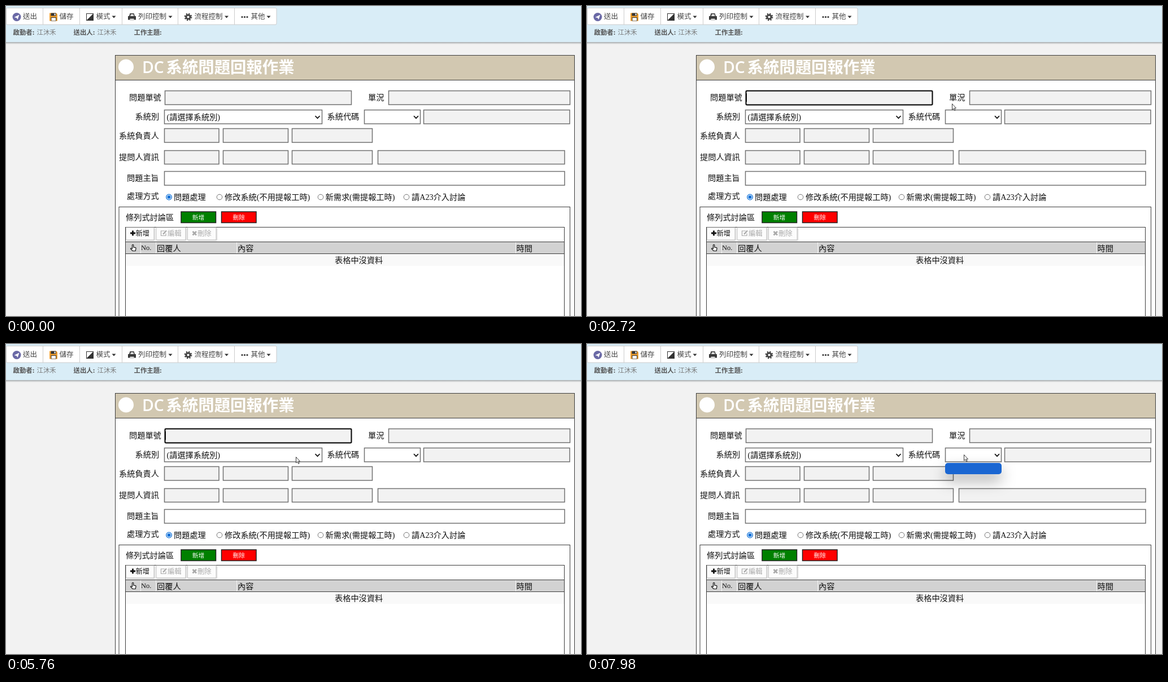
Animation, 1018 px wide and 550 px high, one loop 8000 ms. Source, as an HTML page:

```html
<!DOCTYPE html>
<html lang="zh-Hant">
<head>
<meta charset="utf-8">
<title>問題回報作業</title>
<style>
html, body { margin: 0; width: 100%; height: 100%; overflow: hidden; background: #f2f2f2; }
svg { display: block; }
text { white-space: pre; }
.ui { font-family: "Noto Sans CJK TC", "Noto Sans CJK JP", "Noto Sans CJK SC", sans-serif; }
.form { font: 14.2px "Liberation Serif", "Noto Sans CJK TC", "Noto Sans CJK JP", serif; fill: #111; }
.menu { font-size: 12.5px; fill: #444; }
.info { font-size: 11.4px; fill: #777; }
.info .key { font-weight: 700; fill: #555; }
.field { fill: #f2f2f2; stroke: #727272; stroke-width: 1.5; }
.open { fill: #fff; }
.ring { fill: none; stroke: #101010; stroke-width: 2; }
.chevron { fill: none; stroke: #111; stroke-width: 1.8; }
.frame { fill: none; stroke: #3c3c3c; }
.mini { fill: #fcfcfc; stroke: #c4c4c4; filter: drop-shadow(1px 1px 1px #0003); }
.popup { filter: drop-shadow(0 12px 13px rgba(0, 0, 0, .32)); }

.step { opacity: 0; animation: 8s step-end infinite; }
#cursor { animation: move 8s linear infinite; }

@keyframes move {
  0%, 4.875% { transform: translate(483px, 5px); }
  12.75% { transform: translate(379.5px, 131.5px); }
  14.5% { transform: translate(352px, 155px); }
  15.375%, 21.375% { transform: translate(352px, 160px); }
  28.125%, 29.875% { transform: translate(402px, 168px); }
  34% { transform: translate(646px, 173px); }
  36.5% { transform: translate(640px, 177px); }
  39.75% { transform: translate(520px, 171px); }
  41.5%, 45.75% { transform: translate(508.5px, 171px); }
  46.5%, 61.5% { transform: translate(513.5px, 165.5px); }
  64% { transform: translate(600px, 159px); }
  66.5% { transform: translate(761px, 170px); }
  69% { transform: translate(640px, 195px); }
  71.25% { transform: translate(515px, 200px); }
  72%, 80.4% { transform: translate(513px, 200px); }
  81.25%, 88.5% { transform: translate(509px, 199px); }
  94.5%, 97% { transform: translate(648px, 195px); }
  99.75%, 100% { transform: translate(667px, 196px); }
}
@keyframes arrow {
  0% { opacity: 0; } 4.875% { opacity: 1; } 10.5% { opacity: 0; }
  33.4% { opacity: 1; } 37.3% { opacity: 0; } 64.2%, 100% { opacity: 1; }
}
@keyframes beam {
  0% { opacity: 0; } 10.5% { opacity: 1; } 33.4% { opacity: 0; }
  37.3% { opacity: 1; } 64.2%, 100% { opacity: 0; }
}
@keyframes click {
  0% { opacity: 0; } 15.375% { opacity: 1; } 18% { opacity: .66; } 18.8% { opacity: .33; } 19.625% { opacity: 0; }
  74.5% { opacity: 1; } 76.375% { opacity: .66; } 77.5% { opacity: .33; } 78.75% { opacity: 0; }
  87% { opacity: 1; } 88.5% { opacity: 0; } 94.5% { opacity: 1; } 96.6%, 100% { opacity: 0; }
}
@keyframes focus-no { 0% { opacity: 0; } 15.375% { opacity: 1; } 74.5%, 100% { opacity: 0; } }
@keyframes focus-system { 0% { opacity: 0; } 87% { opacity: 1; } 94.5%, 100% { opacity: 0; } }
@keyframes list-system { 0% { opacity: 0; } 74.5% { opacity: 1; } 87%, 100% { opacity: 0; } }
@keyframes list-code { 0% { opacity: 0; } 95%, 100% { opacity: 1; } }
@keyframes key1 { 0% { opacity: 0; } 38.875% { opacity: 1; } 56.625%, 100% { opacity: 0; } }
@keyframes key2 { 0% { opacity: 0; } 40.625% { opacity: 1; } 54.875%, 100% { opacity: 0; } }
@keyframes key3 { 0% { opacity: 0; } 44% { opacity: 1; } 52.25%, 100% { opacity: 0; } }
@keyframes caret {
  0% { opacity: 0; transform: none; }
  15.375% { opacity: 1; } 21.625% { opacity: 0; } 27.875% { opacity: 1; } 34.125% { opacity: 0; transform: none; }
  38.875% { opacity: 1; transform: translateX(6px); }
  40.625% { opacity: 1; transform: translateX(12px); }
  44% { opacity: 1; transform: translateX(18px); }
  50.625% { opacity: 0; transform: translateX(18px); }
  52.25% { opacity: 1; transform: translateX(12px); }
  54.875% { opacity: 1; transform: translateX(6px); }
  56.625% { opacity: 1; transform: none; }
  63.75% { opacity: 0; } 70% { opacity: 1; } 74.5%, 100% { opacity: 0; transform: none; }
}
</style>
</head>
<body>
<svg width="1018" height="550" viewBox="0 0 1018 550">
  <defs>
    <linearGradient id="fade" x2="0" y2="1">
      <stop stop-color="#a4a8aa"/><stop offset="1" stop-color="#f2f2f2"/>
    </linearGradient>
    <path id="down" d="M-3.5-1.5h7l-3.5 4z" fill="#333"/>
    <path id="chev" class="chevron" d="M-4-2 0 2.2 4-2"/>
    <circle id="radio" r="4.8" fill="#fff" stroke="#767676"/>
  </defs>

  <!-- toolbar -->
  <rect width="1018" height="64" fill="#d9edf7"/>
  <rect y="64" width="1018" height="4" fill="url(#fade)"/>
  <rect x=".5" y="3.5" width="478.500" height="29.500" rx="2" fill="#fff" stroke="#ccc"/>
  <path d="M65.500 4v29M130.500 4v29M205.500 4v29M304.500 4v29M404.500 4v29" stroke="#ccc"/>
  <circle cx="19" cy="19.500" r="7.500" fill="#6a69a6"/>
  <path d="M14.500 20 23.500 15.500 20.500 24 18.800 21z" fill="#fff"/>
  <path d="M77 12.500h12l2 2v12h-14z" fill="#f0a030"/>
  <path d="M79.500 12.500h9v5h-9zM79.500 20h9.500v6.500h-9.500z" fill="#333"/>
  <path d="M80.500 21h7.500v5h-7.500zM85.500 13.500h2v3h-2z" fill="#fff"/>
  <rect x="142.500" y="13.500" width="12" height="12" fill="#fff" stroke="#333"/>
  <path d="M154.500 13.500v12h-12z" fill="#333"/>
  <path d="M219.500 13h7l1.500 5h2v6.500h-14v-6.500h2z" fill="#3a3a3a"/>
  <path d="M221 14.500h4.500l1 3.500h-6.500zM219.500 22.500h7v3.500h-7z" fill="#ddd"/>
  <circle cx="322.500" cy="19.500" r="5.700" fill="none" stroke="#444" stroke-width="2.400" stroke-dasharray="2.240"/>
  <circle cx="322.500" cy="19.500" r="3.600" fill="none" stroke="#444" stroke-width="3"/>
  <g fill="#333"><circle cx="418" cy="19.500" r="1.600"/><circle cx="422.500" cy="19.500" r="1.600"/><circle cx="427" cy="19.500" r="1.600"/></g>
  <g class="ui menu">
    <text x="30" y="22.800">送出</text>
    <text x="94.500" y="22.800">儲存</text>
    <text x="159.500" y="22.800">模式</text>
    <text x="234" y="22.800">列印控制</text>
    <text x="333.500" y="22.800">流程控制</text>
    <text x="433.500" y="22.800">其他</text>
  </g>
  <use href="#down" x="191" y="19"/><use href="#down" x="291" y="19"/>
  <use href="#down" x="390.500" y="19"/><use href="#down" x="465" y="19"/>
  <g class="ui info">
    <text x="12.500" y="51.300" class="key">啟動者:</text><text x="54.500" y="51.300">江沐禾</text>
    <text x="119.500" y="51.300" class="key">送出人:</text><text x="161.500" y="51.300">江沐禾</text>
    <text x="226.500" y="51.300" class="key">工作主題:</text>
  </g>

  <!-- form panel -->
  <rect x="193.500" y="87.500" width="813" height="480" fill="#fff" stroke="#3c3c3c"/>
  <rect x="193.500" y="87.500" width="813" height="44" fill="#d2c8b1" stroke="#3c3c3c"/>
  <circle cx="212.500" cy="108" r="13.500" fill="#fff"/>
  <g font-size="28.400" font-weight="700" fill="#fff">
    <text x="241" y="118.500" font-family="Open Sans, sans-serif" font-weight="600">DC</text>
    <text x="283.500" y="118.500" class="ui">系統問題回報作業</text>
  </g>

  <g class="field">
    <rect x="281.500" y="150.500" width="330" height="24.500"/>
    <rect x="677.500" y="150.500" width="321" height="24.500"/>
    <rect x="280.500" y="184.500" width="279" height="24.500" class="open"/>
    <rect x="634.500" y="184.500" width="99" height="24.500" class="open"/>
    <rect x="739.500" y="184.500" width="258.500" height="24.500"/>
    <rect x="280.500" y="217.500" width="96.500" height="24.500"/>
    <rect x="384.500" y="217.500" width="115" height="24.500"/>
    <rect x="506.500" y="217.500" width="142" height="24.500"/>
    <rect x="280.500" y="256.500" width="96.500" height="24"/>
    <rect x="384.500" y="256.500" width="115" height="24"/>
    <rect x="506.500" y="256.500" width="142" height="24"/>
    <rect x="658.500" y="256.500" width="330.500" height="24"/>
    <rect x="280.500" y="293.500" width="708.500" height="24.500" class="open"/>
  </g>
  <use href="#chev" x="551.500" y="197"/><use href="#chev" x="726" y="197"/>

  <use href="#radio" x="378" y="339"/><use href="#radio" x="557" y="339"/><use href="#radio" x="709" y="339"/>
  <circle cx="288.500" cy="339" r="4.800" fill="#fff" stroke="#0b6fd8" stroke-width="1.300"/>
  <circle cx="288.500" cy="339" r="3" fill="#0b6fd8"/>

  <g class="form">
    <text x="218" y="166.500">問題單號</text><text x="641" y="166.500">單況</text>
    <text x="228.500" y="201">系統別</text><text x="284.500" y="201.500">(請選擇系統別)</text><text x="568.500" y="201">系統代碼</text>
    <text x="200" y="234.500">系統負責人</text>
    <text x="200" y="272.500">提問人資訊</text>
    <text x="214" y="310">問題主旨</text>
    <text x="214" y="342">處理方式</text>
    <text x="297" y="344">問題處理</text><text x="387" y="344">修改系統(不用提報工時)</text>
    <text x="565.500" y="344">新需求(需提報工時)</text><text x="718" y="344">請A23介入討論</text>
    <text x="212" y="379.500">條列式討論區</text>
  </g>

  <!-- discussion table -->
  <rect class="frame" x="200" y="356.500" width="798.500" height="220"/>
  <g stroke="#222" stroke-width="1.500">
    <rect x="310" y="365" width="61.500" height="19.500" fill="#008000"/>
    <rect x="381.500" y="365" width="61.500" height="19.500" fill="#f00"/>
  </g>
  <g class="ui" font-size="10.700" fill="#fff">
    <text x="329.800" y="379">新增</text><text x="401.500" y="379">刪除</text>
  </g>
  <rect class="frame" x="211.500" y="392.500" width="777" height="180"/>
  <g class="mini">
    <rect x="212.500" y="393" width="49.500" height="22"/>
    <rect x="266" y="393" width="52" height="22"/>
    <rect x="321.500" y="393" width="50.500" height="22"/>
  </g>
  <path d="M224.500 398.500v9M220 403h9" stroke="#111" stroke-width="2.800"/>
  <g fill="none" stroke="#aaa">
    <path d="M281 399h-6.500v8.500h8.500v-4" stroke-width="1.200"/><path d="m278 405 6-6.500" stroke-width="2.400"/>
    <path d="m330.500 400 6.500 6.500m0-6.500-6.500 6.500" stroke-width="2.800"/>
  </g>
  <g class="ui" font-size="12.300" fill="#111">
    <text x="229.500" y="407.500">新增</text>
    <g fill="#aaa"><text x="286" y="407.500">編輯</text><text x="339" y="407.500">刪除</text></g>
  </g>
  <rect x="211.500" y="418.500" width="777" height="21" fill="#d2d2d2" stroke="#3c3c3c"/>
  <path d="M238.500 419v20M265.500 419v20M408.500 419v20M902.500 419v20" stroke="#f4f4f4"/>
  <rect x="212" y="440" width="776" height="21" fill="#f9f9f9"/>
  <path d="M223.500 430.500v-6.500q1.200-1.500 2.200 0v4l3.500.6q1 .3.800 1.600l-.8 4.300h-5l-3.700-4q.6-1.500 3 0z" fill="#fff" stroke="#111" stroke-width="1.200"/>
  <g class="form">
    <text x="239" y="433" font-size="12.400">No.</text>
    <text x="267" y="434.500">回覆人</text><text x="410" y="434.500">內容</text><text x="903.500" y="434.500">時間</text>
    <text x="582" y="455.500">表格中沒資料</text>
  </g>

  <!-- typing and focus -->
  <rect class="ring step" style="animation-name:focus-no" x="281.500" y="150.500" width="330" height="25" rx="2"/>
  <rect class="ring step" style="animation-name:focus-system" x="280.500" y="184.500" width="279" height="25" rx="2"/>
  <g class="form" font-size="13.500">
    <text class="step" style="animation-name:key1" x="282" y="168">e</text>
    <text class="step" style="animation-name:key2" x="288" y="168">e</text>
    <text class="step" style="animation-name:key3" x="294" y="168">e</text>
  </g>
  <rect class="step" style="animation-name:caret" x="282" y="155" width="1" height="15"/>

  <!-- dropdown lists -->
  <g class="step" style="animation-name:list-system">
    <rect class="popup" x="280" y="211" width="280" height="101" rx="5" fill="#fff"/>
    <path d="M280 231v-15q0-5 5-5h270q5 0 5 5v15z" fill="#1a66d2"/>
    <g class="form">
      <text x="284.500" y="226.500" fill="#fff">(請選擇系統別)</text>
      <text x="284.500" y="246.500">生產系統</text><text x="284.500" y="266.500">人事系統</text>
      <text x="284.500" y="286.500">財務系統</text><text x="284.500" y="306.500">其他系統</text>
    </g>
  </g>
  <g class="step" style="animation-name:list-code">
    <rect class="popup" x="634" y="211" width="100" height="20" rx="5" fill="#1a66d2"/>
  </g>

  <g id="cursor">
    <circle class="step" style="animation-name:click" r="10" fill="#fff35c" fill-opacity=".85"/>
    <path class="step" style="animation-name:arrow" d="M.5.5v10.500l2.400-2.200 1.700 3.700 1.600-.7-1.700-3.600h3z" fill="#fff" stroke="#222" stroke-width=".9"/>
    <path class="step" style="animation-name:beam" d="M-2.500-5h2q.5 0 .5.500.0-.5.500-.5h2M0-5V5M-2.500 5h5" fill="none" stroke="#222"/>
  </g>
</svg>
</body>
</html>
```
